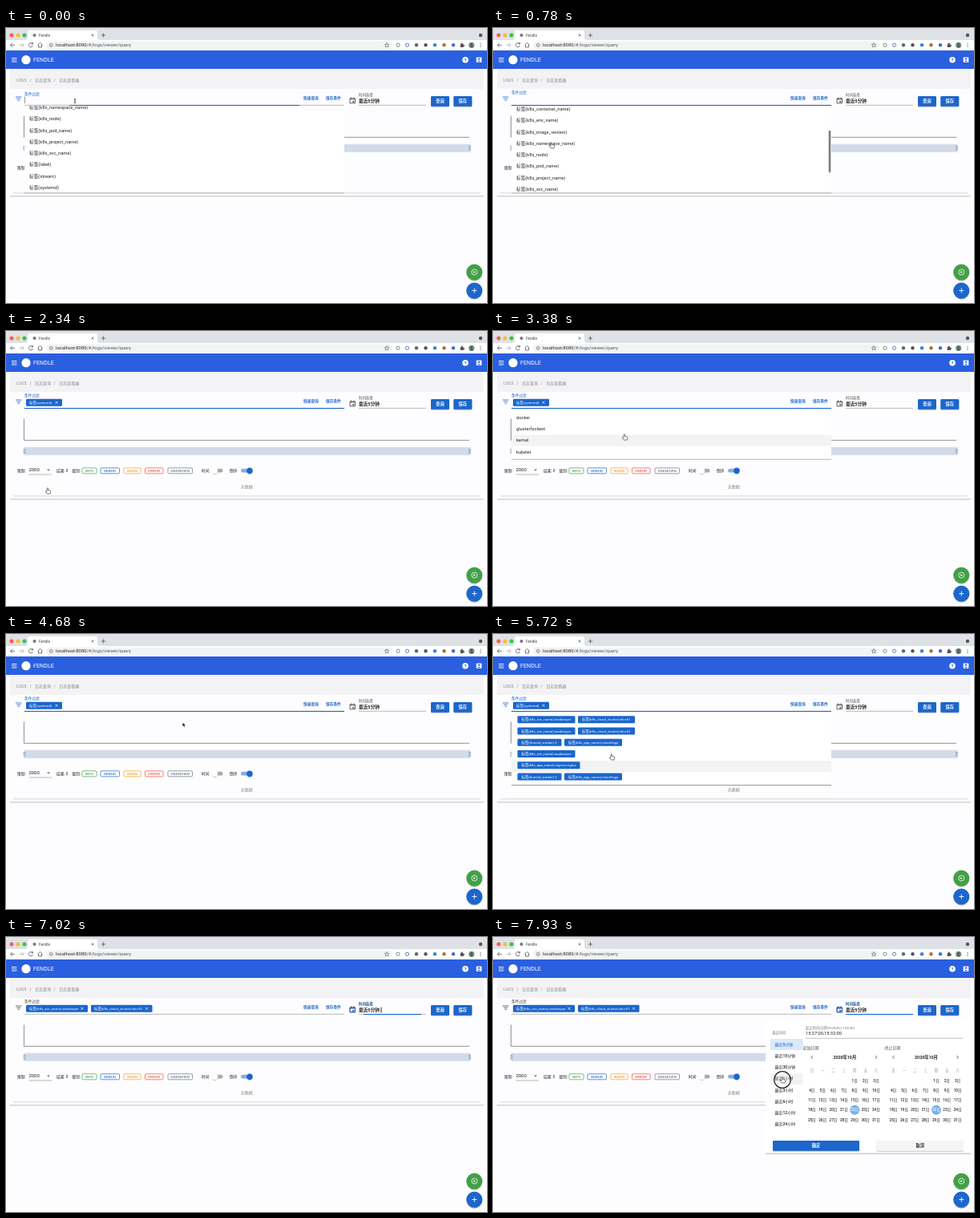
An HTML page that plays this animation: 600 px wide and 343 px high, repeating every 8 s.

```html
<!DOCTYPE html>
<html lang="zh">
<head>
<meta charset="utf-8">
<title>Log viewer</title>
<style>
html, body { margin: 0; width: 100%; height: 100%; overflow: hidden; background: #fdfcfe; }
svg { display: block; }
#stage { width: 600px; height: 343px; }
text { font-family: Roboto, "Noto Sans CJK SC", "Noto Sans CJK", sans-serif; white-space: pre; }

.step { animation: 8s step-end infinite; }
.move { animation: 8s linear infinite; }
.grow { transform-box: fill-box; transform-origin: center; }

#keys { animation-name: keys; }
#values { animation-name: values; }
#quick { animation-name: quick; }
#panel { animation-name: panel; }
#chipOne { animation-name: chipOne; }
#chipTwo { animation-name: chipTwo; }
#focus { animation-name: fieldTint; }
#fieldLine { animation-name: fieldLine, fieldGrow; }
#fieldLabel { animation-name: fieldLabel; }
#dateLine { animation-name: dateOn, dateGrow; }
#dateTint { animation-name: dateOn; }
#caret { animation-name: caret; }
#keysList { animation-name: scroll; }
#thumb { animation-name: thumb; }
#keysHover { animation-name: keysHover; }
#valuesHover { animation-name: valuesHover; }
#quickHover { animation-name: quickHover; }
#pointer { animation-name: path; }
#beam { animation-name: beam; }
#hand { animation-name: hand; }
#arrow { animation-name: arrow; }
#ring { animation-name: ring; }

@keyframes keys { 0% { visibility: visible } 29.25%, to { visibility: hidden } }
@keyframes values { 0%, 53.625%, to { visibility: hidden } 30.875% { visibility: visible } }
@keyframes quick { 0%, 78%, to { visibility: hidden } 65% { visibility: visible } }
@keyframes panel { 0% { visibility: hidden } 89.375%, to { visibility: visible } }
@keyframes chipOne { 0%, 78%, to { visibility: hidden } 29.25% { visibility: visible } }
@keyframes chipTwo { 0% { visibility: hidden } 78%, to { visibility: visible } }
@keyframes fieldTint { 0% { color: #1a66cc } 86.125%, to { color: #444 } }
@keyframes fieldLine { 0% { visibility: visible } 86.125%, to { visibility: hidden } }
@keyframes fieldGrow { 0% { transform: scaleX(.72) } 1.625%, to { transform: none } }
@keyframes fieldLabel { 0% { transform: translateY(2px) } 1.625%, to { transform: none } }
@keyframes dateOn { 0% { visibility: hidden } 87.75%, to { visibility: visible } }
@keyframes dateGrow { 0%, 87.75% { transform: scaleX(.86) } 89.375%, to { transform: none } }
@keyframes caret { 0%, 6.5%, 13%, 19.5%, 26% { visibility: visible } 9.75%, 22.75%, 29.25%, to { visibility: hidden } }
@keyframes scroll {
  0%, 6.5% { transform: translateY(-108.5px); animation-timing-function: steps(4) }
  13%, 14.625% { transform: translateY(-19px); animation-timing-function: steps(2) }
  17.875% { transform: translateY(-44.3px); animation-timing-function: steps(4) }
  24.375%, to { transform: translateY(-108.5px) }
}
@keyframes thumb {
  0%, 6.5% { visibility: hidden; transform: translateY(52px); animation-timing-function: steps(4) }
  6.51% { visibility: visible }
  13%, 14.625% { transform: translateY(9px); animation-timing-function: steps(2) }
  17.875% { transform: translateY(21px); animation-timing-function: steps(4) }
  24.375% { visibility: visible; transform: translateY(52px) }
  27.625%, to { visibility: hidden; transform: translateY(52px) }
}
@keyframes keysHover {
  0% { opacity: 0 }
  13% { opacity: 1; transform: translateY(57px) }
  26%, to { opacity: 1; transform: translateY(199.5px) }
}
@keyframes valuesHover {
  0% { opacity: 0 }
  40.625% { opacity: 1; transform: translateY(28.5px) }
  48.75%, to { opacity: 0 }
}
@keyframes quickHover {
  0% { opacity: 0 }
  69.875% { opacity: 1; transform: translateY(57px) }
  73.125% { opacity: 1; transform: translateY(28.5px) }
  74.75%, to { opacity: 1; transform: none }
}
@keyframes path {
  0% { transform: translate(86px, 91px); animation-timing-function: steps(6) }
  9.75%, 24.375% { transform: translate(73px, 146px); animation-timing-function: steps(2) }
  27.625%, 32.5% { transform: translate(52px, 199px); animation-timing-function: steps(6) }
  42.25%, 47.125% { transform: translate(164px, 132px); animation-timing-function: steps(7) }
  58.5% { transform: translate(221px, 113px); animation-timing-function: steps(3) }
  63.375%, 65% { transform: translate(380px, 88px); animation-timing-function: steps(4) }
  71.5% { transform: translate(148px, 153px); animation-timing-function: steps(3) }
  76.375%, 79.625% { transform: translate(120px, 107px); animation-timing-function: steps(5) }
  87.75%, 91% { transform: translate(468px, 91px); animation-timing-function: steps(4) }
  97.5%, to { transform: translate(361px, 178px) }
}
@keyframes beam { 0%, 87.75% { visibility: visible } 3.25%, 92.625%, to { visibility: hidden } }
@keyframes hand { 0%, 52%, 79.625% { visibility: hidden } 3.25%, 63.375%, 92.625%, to { visibility: visible } }
@keyframes arrow { 0%, 63.375%, 87.75%, to { visibility: hidden } 52%, 79.625% { visibility: visible } }
@keyframes ring { 0% { visibility: hidden } 99.125%, to { visibility: visible } }
</style>
</head>
<body>
<svg id="stage" viewBox="0 0 600 343" xmlns="http://www.w3.org/2000/svg">
  <defs>
    <filter id="shadow" x="-10%" y="-10%" width="120%" height="130%">
      <feDropShadow dx="0" dy=".9" stdDeviation=".7" flood-opacity=".42"/>
    </filter>
    <filter id="soft" x="-20%" y="-20%" width="140%" height="160%">
      <feDropShadow dx="0" dy=".7" stdDeviation=".5" flood-opacity=".32"/>
    </filter>
  </defs>
  <g id="page"></g>
  <g id="chipOne" class="step"></g>
  <g id="chipTwo" class="step"></g>
  <g id="keys" class="step"></g>
  <g id="values" class="step"></g>
  <g id="quick" class="step"></g>
  <g id="focus" class="step"></g>
  <g id="panel" class="step"></g>
  <g id="pointer" class="move">
    <g id="beam" class="step">
      <path d="M-1.300-2.900Q0-2.900 0-2V2Q0 2.900-1.300 2.900M1.300-2.900Q0-2.900 0-2V2Q0 2.900 1.300 2.900" fill="none" stroke="#333" stroke-width=".6"/>
    </g>
    <g id="hand" class="step">
      <circle id="ring" class="step" r="10.3" fill="#fff" fill-opacity=".25" stroke="#222" stroke-width="1.2"/>
      <path d="M-1-2.8Q-.2-3.6.5-2.8V-.5L3.2.1Q4 .5 3.7 1.6L3 4H-.6L-2.8 1.2Q-2.6.2-1 1Z" fill="#fff" stroke="#222" stroke-width=".6"/>
    </g>
    <g id="arrow" class="step">
      <path d="M-.7-2.8V2.6L.5 1.5 1.4 3.3 2.3 2.8 1.5 1.1H3.1Z" fill="#111" stroke="#fff" stroke-width=".4"/>
    </g>
  </g>
</svg>
<script>
const BLUE = '#1a66cc', INK = '#222', GREY = '#8a8a8a', ROW = 14.25;
const put = (id, ...parts) => { document.getElementById(id).innerHTML = parts.flat().join(''); };

// Text is placed by its left edge (or middle) and vertical centre.
const text = (x, y, s, size = 5, fill = INK, more = '') =>
  `<text x="${x}" y="${y + size * .36}" font-size="${size}" fill="${fill}" ${more}>${s}</text>`;
const mid = (x, y, s, size, fill, more = '') => text(x, y, s, size, fill, 'text-anchor="middle" ' + more);
const rect = (x, y, w, h, fill, more = '') =>
  `<rect x="${x}" y="${y}" width="${w}" height="${h}" fill="${fill}" ${more}/>`;
const dot = (x, y, r, fill, more = '') => `<circle cx="${x}" cy="${y}" r="${r}" fill="${fill}" ${more}/>`;
const line = (d, stroke, w = .8, more = '') =>
  `<path d="${d}" fill="none" stroke="${stroke}" stroke-width="${w}" ${more}/>`;
const cross = (x, y, r, c, w = .7) => line(`M${x - r} ${y - r}l${2 * r} ${2 * r}m0 ${-2 * r}l${-2 * r} ${2 * r}`, c, w);
const medium = 'font-weight="500"', bold = 'font-weight="700"';
const button = (x, y, w, h, s, fill, ink) =>
  rect(x, y, w, h, fill, 'rx="1.3" filter="url(#soft)"') + mid(x + w / 2, y + h / 2, s, 5.2, ink, bold);
const tag = (x, y, w, s, closable) =>
  rect(x, y - 4.5, w, 9, BLUE, 'rx="1.3"') + text(x + (closable ? 4 : 5), y, s, 4.4, '#fff') +
  (closable ? cross(x + w - 7, y, 1.5, '#fff') : '');
const dateIcon = c =>
  line('M429 88h6.500v5.800h-6.500zM429 88.800h6.500M430.500 86.500v1.500M434 86.500v1.500', c) +
  rect(432.4, 91, 1.8, 1.8, c);

function browser() {
  const ext = ['#777', '#4a6fa5', '#666', '#555', '#3f7fd0', '#a8752c', '#3f6fd0'];
  return [
    rect(0, 0, 600, 15, '#dee1e6'),
    '<path d="M24 15Q27 15 27 12V5.500Q27 3 29.500 3H111.500Q114 3 114 5.500V12Q114 15 117 15Z" fill="#fff"/>',
    ['#f85e57', '#f8bd31', '#35c649'].map((c, i) => dot(7 + 8 * i, 9, 2.5, c)),
    dot(35.5, 9, 2, '#777'), text(41, 9, 'Fendle', 4.7, '#444'),
    cross(108, 9, 1.4, '#555'), line('M119 9h5m-2.500-2.500v5', '#555'), dot(592, 9, 2.2, '#555'),
    rect(0, 15, 600, 13, '#fff'), rect(50, 16.5, 432, 9.5, '#f1f3f4', 'rx="4.700"'),
    line('M11 21.300H5.500m2.500-2.500l-2.500 2.500 2.500 2.500', '#555'),
    line('M16.500 21.300H22m-2.500-2.500l2.500 2.500-2.500 2.500', '#aaa'),
    line('M33 19.500A2.600 2.600 0 1 0 33.500 22M33.500 18v2h-2', '#555'),
    line('M39.500 21.300l3-2.800 3 2.800M40.500 21v3h4v-3', '#555'),
    dot(56.3, 21.3, 2, 'none', 'stroke="#555" stroke-width=".6"'), line('M56.300 20.800v1.600', '#555', .6),
    text(62, 21.2, 'localhost:8080<tspan fill="#555">/#/logs/viewer/query</tspan>', 5.85),
    '<path d="M475 18.500l.8 1.900 2 .1-1.500 1.300.5 2-1.800-1.100-1.800 1.100.5-2-1.500-1.300 2-.1Z" fill="none" stroke="#555" stroke-width=".6"/>',
    ext.map((c, i) => i < 2
      ? dot(489 + 11.5 * i, 21.3, 2.1, 'none', `stroke="${c}" stroke-width=".9"`)
      : dot(489 + 11.5 * i, 21.3, 2.2, c)),
    rect(566.7, 19.9, 4, 4, '#555', 'rx=".5"'), dot(568.7, 19.6, 1, '#555'), dot(571, 21.9, 1, '#555'),
    dot(580.7, 21.3, 3.6, '#789378'), '<path d="M578 23.800q2.700-3 5.400 0z" fill="#3d4840"/>', dot(580.7, 20.5, 1.3, '#3d4840'),
    [-2, 0, 2].map(d => dot(592, 21.3 + d, .6, '#555'))
  ];
}

function appBar() {
  return [
    rect(0, 28, 600, 23, '#2a5fdf'),
    line('M7 37.500h6.500m-6.500 2.300h6.500m-6.500 2.300h6.500', '#fff', .9),
    dot(25, 39.7, 5.6, '#fff'), text(34, 39.8, 'FENDLE', 7.2, '#fff'),
    dot(573, 39.7, 3.8, '#fff'), mid(573, 39.7, '?', 6, '#2a5fdf', bold),
    rect(586.7, 36.4, 6.6, 6.6, '#fff', 'rx=".8"'), dot(590, 38.6, 1.2, '#2a5fdf'),
    '<path d="M587.700 42.300q2.300-3 4.600 0z" fill="#2a5fdf"/>'
  ];
}

function toggle(x, on) {
  return rect(x, 171.8, 13, 4.8, on ? '#85aee6' : '#aaa', 'rx="2.400"') +
    dot(on ? x + 11 : x + 3, 174.2, 3.7, on ? BLUE : '#fff', 'filter="url(#soft)"');
}

function logCard() {
  const levels = [['INFO', 95, 18, '#43a047'], ['DEBUG', 118, 23.5, BLUE], ['WARN', 147, 21, '#f39a21'],
    ['ERROR', 173.5, 22.5, '#f0483e'], ['UNKNOWN', 202, 30.5, '#657585']];
  return [
    rect(5, 52, 591, 157.2, '#fdfcfe', 'rx="1.500" filter="url(#shadow)"'),
    rect(5, 51, 591, 25, '#f3f2f4'),
    text(13, 65.6, 'LOGS', 5, GREY), text(29.5, 65.6, '/', 5, GREY), text(36, 65.6, '日志查询', 5, GREY),
    text(59.5, 65.6, '/', 5, GREY), text(66.3, 65.6, '日志查看器', 5, GREY),
    rect(9, 76, 583, 129.3, '#fdfcfe', 'rx="1.500" filter="url(#soft)"'),
    line('M23 96.300H422', '#888', .6),
    text(371, 87.2, '快速查询', 4.7, BLUE, bold), text(399, 87.2, '保存条件', 4.7, BLUE, bold),
    dateIcon('#444'),
    text(440, 83.3, '时间选择', 4.4, '#555'), text(440, 90.6, '最近5分钟', 5.7, INK, bold),
    line('M440 96.300H524', '#888', .6),
    button(530, 85.1, 23, 12.7, '查询', BLUE, '#fff'), button(558.3, 85.1, 23, 12.7, '保存', BLUE, '#fff'),
    line('M22.500 109.500V136.300H578', '#666', .7),
    rect(22.5, 144.8, 557, 10, '#d2dbe7'),
    [23, 578.5].map(x => rect(x - 1, 147.3, 2, 5, '#c5cfdd', 'stroke="#7e91ad" stroke-width=".5"')),
    text(14, 174, '限制:', 4.7), text(28.5, 173.2, '2000', 5.9), line('M28.500 179H57', '#888', .6),
    '<path d="M51 172.500h4l-2 2z" fill="#666"/>',
    text(63, 174, '结果: 0', 4.7), text(82.5, 174, '级别:', 4.7),
    levels.map(([s, x, w, c]) => rect(x, 170.8, w, 7, '#fff', `rx="1.200" stroke="${c}" stroke-width=".7"`) +
      mid(x + w / 2, 174.4, s, 4.3, c, medium + ' letter-spacing=".3"')),
    text(244, 174, '时间', 4.8), toggle(257.5, false), text(279, 174, '倒序', 4.8), toggle(293, true),
    mid(300.3, 194, '无数据', 5, GREY),
    dot(584.3, 304.5, 10, '#43a047', 'filter="url(#shadow)"'), dot(584.3, 304.5, 3.5, 'none', 'stroke="#fff" stroke-width=".8"'),
    '<path d="M583.300 302.900v3.200l2.500-1.600z" fill="#fff"/>',
    dot(584.3, 327.5, 10, BLUE, 'filter="url(#shadow)"'), line('M581.300 327.500h6m-3-3v6', '#fff', .9)
  ];
}

// Popup list; rows scroll inside a clipped box.
const menu = (id, h, rows) =>
  rect(23, 97, 399, h, '#fff', 'filter="url(#shadow)"') +
  `<svg x="23" y="97" width="399" height="${h}"><g id="${id}List" class="move">` +
  `<rect id="${id}Hover" class="step" y="3.900" width="399" height="${ROW}" fill="#f3f3f3"/>${rows.join('')}</g></svg>`;
const words = list => list.map((s, i) => text(6, 10.9 + ROW * i, s, 5.7));

const keys = ['fluentd_worker', 'host', 'k8s_app_name', 'k8s_cloud_cluster', 'k8s_container_name', 'k8s_env_name',
  'k8s_image_version', 'k8s_namespace_name', 'k8s_node', 'k8s_pod_name', 'k8s_project_name', 'k8s_svc_name',
  'label', 'stream', 'systemd'].map(k => `标签(${k})`);
const svc = '标签(k8s_svc_name):zookeeper', cluster = '标签(k8s_cloud_cluster):dev-k1';
const pair = [[7.5, 72, svc], [83, 71, cluster]];
const worker = [[7.5, 55, '标签(fluentd_worker):2'], [66, 72, '标签(k8s_app_name):cloud-logs']];
const saved = [pair, pair, worker, [pair[0]], [[7.5, 78, '标签(k8s_app_name):ingress-nginx']], worker];

function calendar(x0, title) {
  const col = i => x0 + 13.35 * i;
  const days = Array.from({ length: 31 }, (_, i) => {
    const n = i + 4, x = col(n % 7), y = 179.3 + 12.15 * Math.floor(n / 7), on = i === 21;
    return (on ? dot(x, y, 6, '#79afe9') : '') + mid(x, y, `${i + 1}日`, 4.6, on ? '#fff' : INK, medium);
  });
  return [
    text(x0 - 11, 138, title, 4.9, '#555'),
    line(`M${x0 + 1} 148l-2 2 2 2M${x0 + 79} 148l2 2-2 2`, '#444'),
    mid(x0 + 41, 150, '2020年10月', 5.3, INK, bold),
    [...'日一二三四五六'].map((s, i) => mid(col(i), 166, s, 4.3, GREY)), days
  ].flat();
}

function datePanel() {
  const spans = ['5分钟', '15分钟', '30分钟', '1小时', '3小时', '6小时', '12小时', '24小时'];
  return [
    rect(340, 104, 256, 165.5, '#fff', 'rx="1" filter="url(#shadow)"'),
    text(348.5, 119.8, '最近时间', 4.2, '#777'),
    rect(346, 127, 40.5, 14, '#dce9f9'), rect(346, 170, 40.5, 14, '#f2f2f2'),
    spans.map((s, i) => text(351.5, 134 + 14.2 * i, '最近' + s, 5, i ? INK : BLUE, medium)),
    text(390, 113.6, '起止时间(示例09:00:00,11:00:00)', 4.2, '#777'),
    text(390, 120.4, '15:27:00,15:32:00', 5.7), line('M390 126.300H586', '#999', .6),
    calendar(397.8, '起始日期'), calendar(499.5, '终止日期'),
    button(349, 254, 108, 12.8, '确定', BLUE, '#fff'), button(478.5, 254, 108.5, 12.8, '取消', '#f5f5f5', INK)
  ].flat();
}

put('page', browser().flat(), appBar(), logCard().flat());
put('chipOne', tag(25, 89.2, 45, '标签(systemd)', true));
put('chipTwo', tag(25, 89.2, 77, svc, true), tag(106, 89.2, 76.5, cluster, true));
put('keys', menu('keys', 108.2, words(keys)),
  '<rect id="thumb" class="move" x="418.700" y="97" width="2.600" height="52.500" rx="1.300" fill="#7c7c7c"/>');
put('values', menu('values', 62.5, words(['docker', 'glusterfsclient', 'kernel', 'kubelet'])));
put('quick', menu('quick', 91, saved.map((row, i) =>
  row.map(([x, w, s]) => tag(x, 9.7 + ROW * i, w, s)).join(''))));
put('focus',
  line('M12 86h7.500m-6.200 2.200h5m-3.700 2.200h2.400', 'currentColor'),
  text(23, 80, '条件过滤', 4.7, 'currentColor', 'id="fieldLabel" class="step"'),
  rect(23, 96, 399, 1, BLUE, 'id="fieldLine" class="step grow"'),
  rect(23, 85.5, .6, 8.5, '#555', 'id="caret" class="step"'),
  rect(440, 96, 84, 1, BLUE, 'id="dateLine" class="step grow"'),
  '<g id="dateTint" class="step">', text(440, 83.3, '时间选择', 4.4, BLUE), dateIcon(BLUE), '</g>');
put('panel', datePanel());
</script>
</body>
</html>
```
